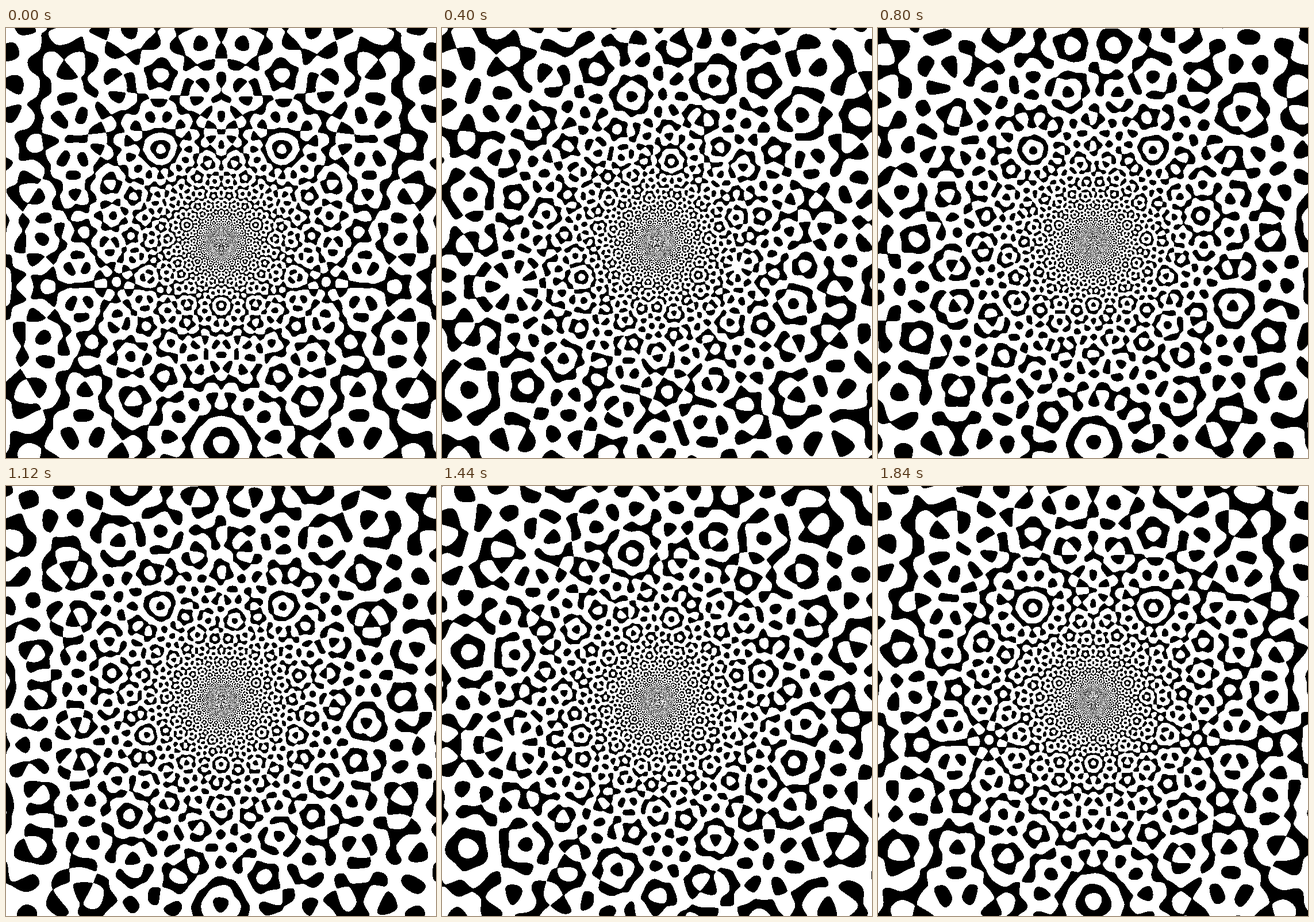
An HTML page with a canvas for the animation above (1.92 s loop, 748 by 748 pixels).

```html
<!DOCTYPE html>
<html lang="en">
<head>
<meta charset="utf-8">
<title>Log-polar quasicrystal</title>
<style>
  html, body { margin: 0; width: 100%; height: 100%; overflow: hidden; background: #fff; }
  canvas { display: block; width: 748px; height: 748px; }
</style>
</head>
<body>
<canvas id="stage" width="748" height="748"></canvas>
<script>
const SIZE = 748;
const GRID = 800;      // units across the stage
const WAVES = 7;
const STRIPES = 61;
const LEVEL = -0.5;    // sums above this are white
const STEPS = 24;
const STEP_MS = 80;

const ctx = document.getElementById("stage").getContext("2d");
const image = ctx.createImageData(SIZE, SIZE);
const pixels = new Uint32Array(image.data.buffer);
const even = new Float32Array(SIZE * SIZE);
const odd = new Float32Array(SIZE * SIZE);

// Waves 1..6 come in mirrored pairs, so three directions are enough.
const pairs = [];
for (let j = 1; j <= (WAVES - 1) / 2; j++) {
  const a = Math.PI * j / WAVES;
  pairs.push([Math.cos(a), Math.sin(a)]);
}

function buildField() {
  const scale = GRID / SIZE;
  const mid = SIZE / 2;
  for (let py = 0, i = 0; py < SIZE; py++) {
    const y = (py - mid) * scale;
    for (let px = 0; px < SIZE; px++, i++) {
      const x = (px - mid) * scale;
      const v = STRIPES * Math.atan2(x, y);
      const u = STRIPES * 0.5 * Math.log(x * x + y * y || 1);
      let c = Math.cos(v);
      let s = Math.sin(v);
      for (const [ca, sa] of pairs) {
        const amp = 2 * Math.cos(v * ca);
        c += amp * Math.cos(u * sa);
        s -= amp * Math.sin(u * sa);
      }
      even[i] = c;
      odd[i] = s;
    }
  }
}

function draw(step) {
  const phase = 2 * Math.PI * step / STEPS;
  const c = Math.cos(phase);
  const s = Math.sin(phase);
  for (let i = 0; i < pixels.length; i++) {
    pixels[i] = c * even[i] - s * odd[i] > LEVEL ? 0xffffffff : 0xff000000;
  }
  ctx.putImageData(image, 0, 0);
}

buildField();
let shown = 0;
draw(shown);
const start = performance.now();

function tick() {
  const elapsed = Math.max(0, performance.now() - start);
  const step = Math.floor(elapsed / STEP_MS) % STEPS;
  if (step !== shown) {
    shown = step;
    draw(step);
  }
  requestAnimationFrame(tick);
}
requestAnimationFrame(tick);
</script>
</body>
</html>
```
